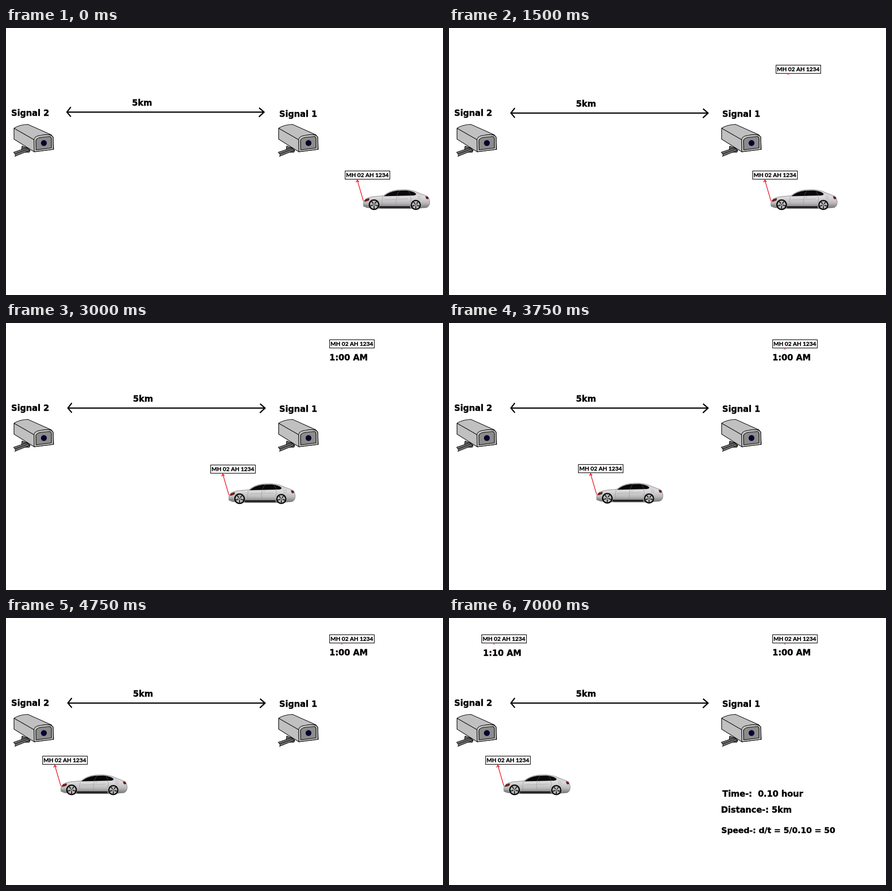
An HTML page with a canvas for the animation above (7250 ms loop, 900 by 550 pixels).

```html
<!DOCTYPE html>
<html lang="en">
<head>
<meta charset="utf-8">
<title>Average speed check</title>
<style>
  html, body { margin: 0; width: 100%; height: 100%; overflow: hidden; background: #fff; }
  canvas { display: block; }
</style>
</head>
<body>
<canvas id="stage" width="900" height="550"></canvas>
<script>
const ctx = document.getElementById('stage').getContext('2d');
const STEP = 250, STEPS = 29;

// Each key is [step, x, y]; positions between keys are linear.
const carKeys = [[0, 698, 294], [3, 625, 294], [7, 625, 294], [8, 579, 293],
  [10, 495, 293], [12, 421, 292], [15, 266, 291], [19, 75, 284]];
const firstReading = [[3, 693, 228], [5, 679, 118], [7, 666, 34]];
const secondReading = [[20, 114, 251], [25, 67, 34]];

function at(keys, step) {
  const next = keys.findIndex(k => k[0] > step);
  if (next < 0) return keys[keys.length - 1].slice(1);
  const a = keys[next - 1], b = keys[next];
  const p = (step - a[0]) / (b[0] - a[0]);
  return [1, 2].map(i => Math.round(a[i] + (b[i] - a[i]) * p));
}

function shape(d, fill, stroke, width = 1) {
  const path = new Path2D(d);
  if (fill) { ctx.fillStyle = fill; ctx.fill(path); }
  if (stroke) { ctx.strokeStyle = stroke; ctx.lineWidth = width; ctx.stroke(path); }
}

function disc(x, y, r, fill) {
  ctx.fillStyle = fill;
  ctx.beginPath();
  ctx.arc(x, y, r, 0, Math.PI * 2);
  ctx.fill();
}

function shifted(x, y, draw) {
  ctx.save();
  ctx.translate(x, y);
  draw();
  ctx.restore();
}

// Bold text with a thin outline for extra weight.
function heavyText(text, x, y, font, weight) {
  ctx.font = font;
  ctx.fillStyle = ctx.strokeStyle = '#000';
  ctx.lineWidth = weight;
  ctx.lineJoin = 'round';
  ctx.fillText(text, x, y);
  ctx.strokeText(text, x, y);
  ctx.lineJoin = 'miter';
}

function label(text, x, y, size = 17.2) {
  heavyText(text, x, y, `bold ${size}px "DejaVu Sans", sans-serif`, 0.5);
}

function camera() {
  shape('M33 243L44 247L50 252L48 256L38 256L32 250Z', '#606060', '#000');
  shape('M15.5 256L42 247L49 252L18 264.5L20 261Z', '#707070', '#000');
  shape('M17 260L44 250', null, '#000');
  shape('M16.5 206.5Q28 199 45 198.5L93 220L97 225L98 250L58 255L16.5 229Z', '#c0c0c0', '#000', 1.2);
  shape('M16.5 206.5L57.5 230', null, '#000', 1.2);
  shape('M58 255L57.5 230Q59 222 72 221Q93 217 97 225L97.5 250Z', '#c4c4c4', '#000', 1.2);
  shape('M62 251L61.5 232Q63 226 74 225L90 223.5Q93 224 93.5 228L93.5 247Z', '#8c8c8c', '#000', 1.2);
  disc(78, 237, 6, '#000');
  disc(78, 237, 4.5, '#000048');
}

function distanceArrow(step) {
  const [x, y] = step < 3 ? [0, 0] : step < 6 ? [2, 7] : [2, 2];
  shifted(x, y, () => {
    label('5km', 259.5, 160);
    ctx.lineCap = 'round';
    shape('M126 173.25L531 173.25M133 163.5L125.5 173.25L133 182M522 165L531.5 173.25L521.5 182.5',
      null, '#000', 2.5);
    ctx.lineCap = 'butt';
  });
}

function plate() {
  ctx.fillStyle = '#fff';
  ctx.fillRect(0, 0, 93, 18);
  ctx.strokeStyle = '#000';
  ctx.lineWidth = 1.2;
  ctx.strokeRect(0.5, 0.5, 92, 17);
  heavyText('MH 02 AH 1234', 2.2, 13.4, 'bold 11.9px Lato, sans-serif', 0.35);
}

function reading(keys, step) {
  if (step < keys[0][0]) return;
  shifted(...at(keys, step), () => {
    plate();
    shape('M23.5 20.5L25 19L27.5 20.5', null, '#f01020');
  });
}

function wheel(x, y, r) {
  disc(x, y, r, '#080808');
  disc(x, y, r - 2.6, '#b8b8b8');
  ctx.strokeStyle = '#202020';
  ctx.lineWidth = 2;
  for (let i = 0; i < 5; i++) {
    const angle = Math.PI * (0.4 * i + 0.5);
    ctx.beginPath();
    ctx.moveTo(x + 2.5 * Math.cos(angle), y + 2.5 * Math.sin(angle));
    ctx.lineTo(x + (r - 2.5) * Math.cos(angle), y + (r - 2.5) * Math.sin(angle));
    ctx.stroke();
  }
  disc(x, y, 1.3, '#404040');
}

function car() {
  const paint = ctx.createLinearGradient(0, 39, 0, 78);
  paint.addColorStop(0, '#cccacc');
  paint.addColorStop(0.4, '#dcdadc');
  paint.addColorStop(0.7, '#bcbabc');
  paint.addColorStop(1, '#707070');
  shape('M38 66L39 62L43 58Q49 54 61 53L79 51.5Q91 42 105 40Q126 37 143 42L158 48L169 52Q175 57 174.5 66Q174 74 168 76L143 78L75 78L45 76L38 73Z',
    paint, '#777', 0.8);
  shape('M80 52.5Q91 43 108 41L126 40.5Q141 42 146 47Q148 50 141 51Z', '#080808');
  shape('M112 41L106 52M131 42L136 51', null, '#555', 0.9);
  shape('M78 53Q75 63 78 75M107 52L105 61L106 75M134 51Q138 57 134 65', null, '#999', 0.8);
  shape('M80 60L130 58M109 55L113 55', null, '#aaa', 0.8);
  shape('M71 73L134 73L134 77L71 77Z', '#252525');
  shape('M40 63L43 59L50 57L49 61L43 63Z', '#8c1818', '#301010', 0.8);
  shape('M166 53L171 54L172 58L168 58Z', '#851018', '#301010', 0.7);
  shape('M38 70L46 71L47 75L41 75Z', '#888');
  shape('M151 53h5v5h-5Z', null, '#aaa', 0.7);
  wheel(60, 70, 11);
  wheel(146, 70.5, 10.5);
}

function movingCar(step) {
  shifted(...at(carKeys, step), () => {
    car();
    plate();
    shape('M38 62L25.5 19.5M23 24L25.5 19L29 23', null, '#f01020', 1.4);
  });
}

function draw(step) {
  ctx.fillStyle = '#fff';
  ctx.fillRect(0, 0, 900, 550);
  label('Signal 2', 10.8, 181);
  label('Signal 1', 562.8, 183);
  camera();
  shifted(545, 0, camera);
  distanceArrow(step);
  movingCar(step);
  reading(firstReading, step);
  reading(secondReading, step);
  if (step >= 7) label('1:00 AM', 666, 77);
  if (step >= 26) label('1:10 AM', 70, 78);
  if (step >= 28) {
    label('Time-:  0.10 hour', 563, 368);
    label('Distance-: 5km', 560.3, 401);
    label('Speed-: d/t = 5/0.10 = 50', 560.8, 443, 16.5);
  }
}

function tick() {
  draw(Math.floor(performance.now() / STEP) % STEPS);
  requestAnimationFrame(tick);
}
tick();
</script>
</body>
</html>
```
